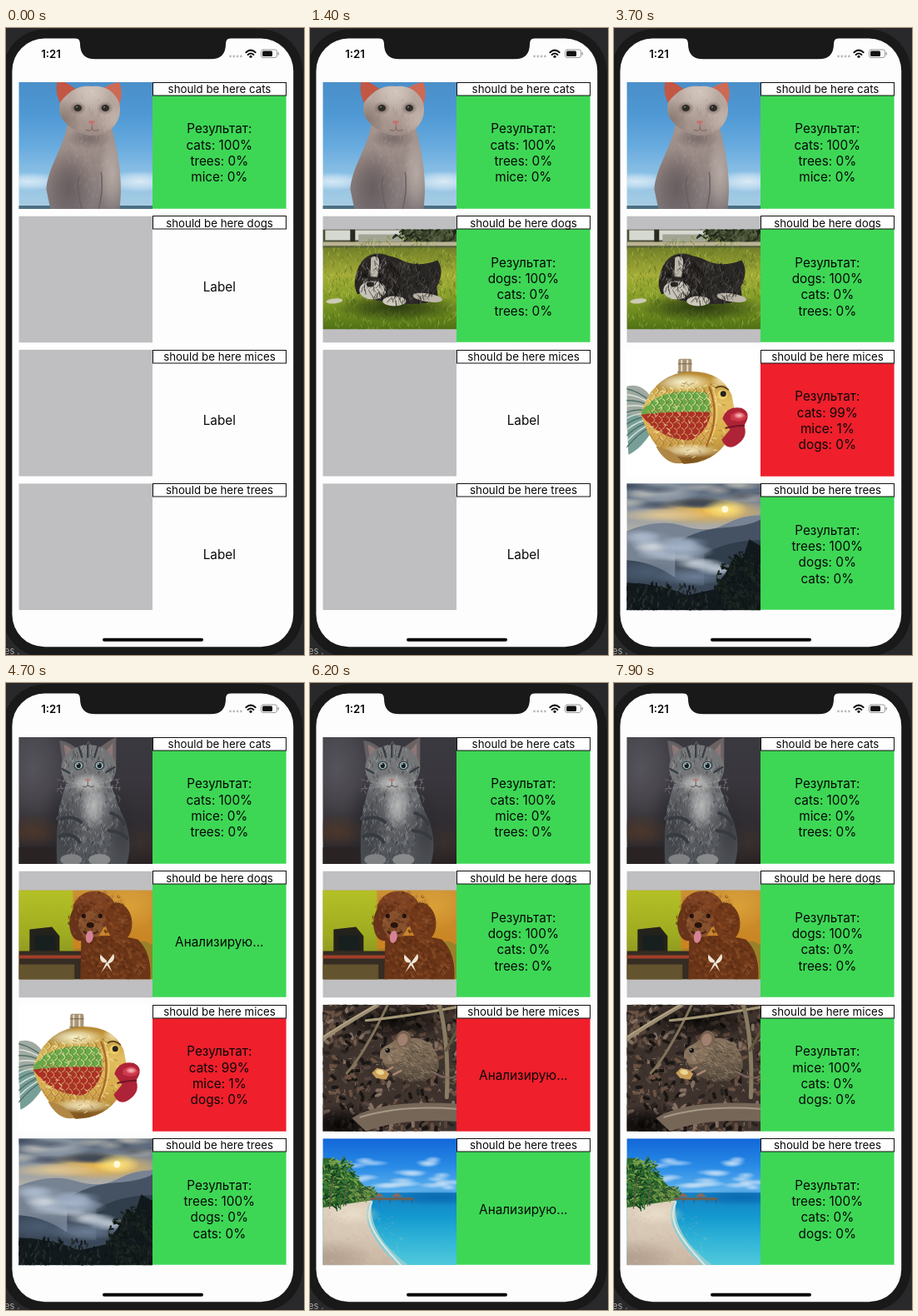
Animation, 358 px wide and 752 px high, one loop 8 s. Source, as an HTML page with a canvas:

```html
<!DOCTYPE html>
<html lang="en">
<head>
<meta charset="utf-8">
<style>
html, body { margin: 0; width: 100%; height: 100%; overflow: hidden; background: #202022; }
canvas { display: block; width: 358px; height: 752px; }
</style>
</head>
<body>
<canvas id="stage"></canvas>
<script>
const W = 358, H = 752, LOOP = 8000;
const GREEN = '#3dd755', RED = '#ef1f2c', GRAY = '#bfbec1';
const canvas = document.getElementById('stage');
const scale = window.devicePixelRatio || 1;
canvas.width = W * scale;
canvas.height = H * scale;
const c = canvas.getContext('2d');

let seed = 1;
const rnd = () => (seed = seed * 16807 % 2147483647) / 2147483647;
const between = (a, b) => a + rnd() * (b - a);
const pick = list => list[Math.floor(rnd() * list.length)];

function rect(color, x, y, w, h, r = 0) {
  c.fillStyle = color;
  c.beginPath();
  c.roundRect(x, y, w, h, r);
  c.fill();
}
function shape(color, d) {
  c.fillStyle = color;
  c.fill(new Path2D(d));
}
function line(color, width, d) {
  c.strokeStyle = color;
  c.lineWidth = width;
  c.lineCap = 'round';
  c.stroke(new Path2D(d));
}
function oval(color, x, y, rx, ry = rx, turn = 0) {
  c.fillStyle = color;
  c.beginPath();
  c.ellipse(x, y, rx, ry, turn, 0, Math.PI * 2);
  c.fill();
}
function fade(y, h, ...colors) {
  const g = c.createLinearGradient(0, y, 0, y + h);
  colors.forEach((color, i) => g.addColorStop(i / (colors.length - 1), color));
  return g;
}
// Blurred blob; color is an "r,g,b" triple.
function glow(rgb, alpha, x, y, rx, ry = rx) {
  c.save();
  c.translate(x, y);
  c.scale(rx, ry);
  const g = c.createRadialGradient(0, 0, 0, 0, 0, 1);
  g.addColorStop(0, `rgba(${rgb},${alpha})`);
  g.addColorStop(0.5, `rgba(${rgb},${alpha * 0.6})`);
  g.addColorStop(1, `rgba(${rgb},0)`);
  c.fillStyle = g;
  c.fillRect(-1, -1, 2, 2);
  c.restore();
}
// Random short strokes inside an ellipse: fur, grass, leaves.
function tufts(n, x, y, rx, ry, len, angle, spread, width, colors) {
  c.lineWidth = width;
  c.lineCap = 'round';
  for (let i = 0; i < n; i++) {
    const a = rnd() * Math.PI * 2, r = Math.sqrt(rnd());
    const px = x + Math.cos(a) * r * rx, py = y + Math.sin(a) * r * ry;
    const t = angle + between(-spread, spread);
    c.strokeStyle = pick(colors);
    c.beginPath();
    c.moveTo(px, py);
    c.lineTo(px + Math.cos(t) * len, py + Math.sin(t) * len);
    c.stroke();
  }
}
function inside(d, draw) {
  c.save();
  c.clip(new Path2D(d));
  draw();
  c.restore();
}

const DOWN = Math.PI / 2;

const photos = {
  blank() { rect(GRAY, 0, 0, 161, 152); },

  whiteKitten() {
    rect(fade(0, 152, '#4a8fc9', '#4e98d4', '#67aade', '#8fc2e5', '#a9cde2'), 0, 0, 161, 152);
    glow('235,244,250', .75, 12, 119, 45, 11);
    glow('235,244,250', .8, 145, 119, 42, 13);
    rect('#4d6f82', 0, 148, 161, 4);
    const body = 'M58 52C53 80 36 100 33 128L38 152H121C126 120 119 82 111 52Z';
    shape(fade(55, 97, '#a5958e', '#938581', '#80777a'), body);
    inside(body, () => {
      glow('85,76,80', .65, 60, 125, 30, 45);
      glow('205,194,186', .6, 112, 110, 17, 45);
      glow('85,75,75', .5, 84, 67, 26, 13);
    });
    line('#675f63', 1.5, 'M72 112Q70 135 76 152M99 108Q102 130 96 152');
    shape('#c25746', 'M46 0Q43 14 51 28L72 11Q60 1 54 0Z');
    shape('#cc6a56', 'M99 9Q110 1 121 0Q126 12 121 28Z');
    const head = 'M50 24Q66 2 88 5Q111 3 121 25Q125 45 109 58Q89 70 69 58Q44 45 50 24Z';
    shape(fade(4, 64, '#b9aba2', '#b4a49b', '#988780'), head);
    inside(head, () => {
      glow('225,214,205', .65, 86, 12, 25, 23);
      glow('104,88,82', .5, 54, 44, 22, 24);
      glow('219,205,196', .45, 114, 47, 20, 20);
    });
    tufts(150, 84, 75, 26, 65, 4, DOWN, .5, .6, ['#d6c9c144', '#716a6d44']);
    for (const x of [71, 104]) {
      glow('73,62,57', .6, x, 31, 10, 8);
      oval('#302d29', x, 31, 4.7, 4);
      oval('#a7afa8', x - 1.3, 29.8, .8);
    }
    shape('#c57370', 'M83 47Q88 45 92 47L88 52Z');
    line('#855c59', 1, 'M88 52V56M81 57Q85 60 88 56Q92 60 96 57');
  },

  lawnPuppy() {
    photos.blank();
    inside('M0 16H161V136H0Z', () => {
      rect('#4b5136', 0, 16, 161, 22);
      rect('#d6d9d1', 3, 17, 92, 12);
      rect('#a3a494', 43, 22, 55, 9);
      tufts(130, 128, 20, 42, 12, 5, 1, 2, 2, ['#1e281a', '#343d25', '#596246']);
      rect('#29291e', 33, 16, 6, 25);
      rect('#bbb394', 0, 31, 161, 5);
      rect('#56633a', 0, 36, 161, 4);
      rect(fade(38, 98, '#737f29', '#a4ad37', '#7e9826', '#4f7115'), 0, 38, 161, 98);
      tufts(900, 80, 87, 102, 60, 4, -DOWN, .8, 1,
        ['#c7cf6477', '#3f601477', '#a4b23577', '#5c7a1e77']);
      glow('29,42,13', .85, 89, 109, 76, 18);
      shape('#292725', 'M53 52Q74 42 97 54Q116 62 138 53Q147 66 137 85L139 101Q102 111 57 99Z');
      oval('#2b2826', 67, 67, 24, 22);
      shape('#262321', 'M44 59Q34 81 42 94L55 89V57Z');
      shape('#25221f', 'M77 52Q101 66 90 93L75 84Z');
      oval('#c8c3b9', 60, 89, 16, 11);
      shape('#bdb7ad', 'M58 50Q65 46 68 53L66 73H57Z');
      tufts(130, 64, 73, 23, 28, 6, DOWN, .8, 1, ['#d9d5cc66', '#302d2bbb', '#171615aa']);
      oval('#25211f', 57, 82, 4.5, 3.2);
      glow('12,12,12', 1, 49, 72, 5, 4);
      glow('12,12,12', 1, 70, 72, 5, 4);
      oval('#cccab5', 14, 102, 10, 3, -.1);
      oval('#beb8ab', 126, 98, 18, 5, .15);
      oval('#d0cabd', 86, 102, 14, 6);
      tufts(260, 100, 78, 43, 25, 6, DOWN, .9, 1, ['#4e4a4588', '#111010aa', '#77716a66']);
    });
  },

  glassFish() {
    rect('#fff', 0, 0, 161, 152);
    shape('#a0aaa1', 'M0 44Q18 39 30 58L20 83L0 96Z');
    shape('#779f97', 'M0 78Q18 76 32 95Q18 119 2 126Z');
    for (let i = 0; i < 11; i++) {
      line(i % 2 ? '#dce5db' : '#526f6b', 1.4, `M0 ${47 + i * 7}Q14 ${50 + i * 5} 29 ${62 + i * 3}`);
    }
    rect('#a89478', 62, 11, 16, 20, 2);
    line('#e9dfc8', 2, 'M66 13V29M73 13V29');
    line('#75644b', 1, 'M62 17H78M61 27H79');
    const body = 'M17 77Q29 35 67 27Q111 22 126 54L131 80L122 108Q105 136 69 137Q32 128 17 77Z';
    shape(fade(27, 110, '#b68934', '#e2be60', '#d8ad4c', '#a37930'), body);
    inside(body, () => {
      glow('115,73,23', .8, 76, 133, 52, 18);
      glow('137,92,30', .7, 45, 35, 28, 15);
      shape('#68a947', 'M18 73Q42 43 97 52L101 76Q52 72 18 80Z');
      shape('#ad3025', 'M17 78Q58 73 101 75Q98 99 76 109Q40 108 17 78Z');
      for (let y = 45; y < 113; y += 7) {
        for (let x = 25 + (y % 14 > 6 ? 5 : 0); x < 100; x += 9) {
          line(y < 72 ? '#e0e19dbb' : '#e7aa76aa', 1.3, `M${x} ${y}q7 4 0 8`);
          line('#52391d77', .7, `M${x + 2} ${y}q7 4 0 8`);
        }
      }
      glow('255,255,221', .9, 67, 39, 36, 11);
      glow('255,244,207', .9, 76, 121, 36, 9);
      glow('255,244,202', .75, 114, 37, 14, 9);
      tufts(100, 78, 82, 51, 48, 4, .3, 1, 1.2, ['#fff4ba99', '#8a622b77']);
    });
    line('#a86624', 2.2, 'M99 45Q113 78 96 115');
    line('#f4da92', 1, 'M103 45Q116 78 99 112');
    shape('#b18746', 'M35 116Q56 119 67 136Q48 140 35 116Z');
    oval('#efcc66', 115, 54, 6);
    oval('#24231c', 116, 53, 3.5);
    line('#453316', 1.4, 'M107 46Q114 41 122 48');
    shape('#ae2337', 'M115 83Q120 67 138 70Q151 76 141 91Q146 104 134 113Q121 123 114 108L124 96Z');
    shape('#cf394b', 'M125 78Q138 69 144 81Q139 89 125 84Z');
    line('#711424', 2, 'M119 94Q131 91 141 91');
    glow('255,208,205', .9, 135, 79, 7, 4);
  },

  foggyHills() {
    rect(fade(0, 90, '#4d5c70', '#87929f', '#b9b4aa', '#8996a6'), 0, 0, 161, 152);
    glow('198,205,210', .7, 43, 8, 48, 16);
    glow('238,182,72', 1, 100, 34, 78, 17);
    glow('229,201,148', .9, 44, 38, 58, 9);
    for (let i = 0; i < 18; i++) {
      glow(pick(['49,61,81', '67,73,83', '197,195,186']), .65, between(0, 161), between(0, 27), between(15, 35), 6);
    }
    glow('255,230,124', 1, 118, 31, 28, 12);
    oval('#fff9d8', 118, 31, 4);
    shape('#778392', 'M0 57Q38 42 68 51T118 49T161 38V152H0Z');
    shape('#455263', 'M58 72Q85 55 116 53T161 43V152H58Z');
    shape('#303d4b', 'M93 85Q121 68 161 68V152H93Z');
    for (let i = 0; i < 24; i++) {
      const x = between(-5, 115);
      glow(pick(['220,226,232', '181,195,213', '142,158,181']), .65, x, 61 + x * .25 + between(-9, 18), 25, 8);
    }
    shape('#394758', 'M0 92Q29 94 52 109T108 122V152H0Z');
    glow('123,143,169', .7, 83, 112, 51, 12);
    glow('87,105,129', .6, 25, 106, 41, 14);
    shape('#12191c', 'M0 119Q39 120 73 134L105 127L119 107L131 84L139 91L147 67L161 75V152H0Z');
    tufts(220, 137, 121, 32, 39, 4, .8, 1.1, 2, ['#0d1513', '#26312788', '#17221d']);
    tufts(170, 40, 142, 65, 20, 4, -DOWN, .7, 2, ['#0d1416', '#262d2d', '#161d1e']);
  },

  grayKitten() {
    rect(fade(0, 152, '#3b3940', '#39363d', '#302d32', '#272428'), 0, 0, 161, 152);
    glow('104,102,109', .6, 17, 38, 48, 75);
    glow('82,58,43', .8, 17, 113, 48, 20);
    rect('#292324', 0, 132, 161, 20);
    glow('62,51,47', .7, 145, 126, 30, 25);
    shape(fade(52, 100, '#74777a', '#606266', '#4d5055'),
      'M57 56Q43 92 46 152H130Q139 119 122 88L109 52Z');
    shape('#656064', 'M53 34L49 4Q59 4 75 18Z');
    shape('#6b6264', 'M94 15Q109 3 117 0L117 35Z');
    shape('#8d7779', 'M57 27L54 9Q61 10 68 20ZM104 18L113 7L113 25Z');
    oval('#747577', 84, 37, 33, 28);
    glow('39,41,47', .55, 54, 107, 24, 55);
    glow('42,42,47', .6, 124, 109, 20, 48);
    tufts(520, 84, 79, 39, 75, 4, DOWN, .7, 1, ['#b8baba66', '#32373d99', '#888b8d77']);
    line('#353a40', 2.2, 'M72 11L76 24M83 9V24M95 11L91 24M52 38L61 43M115 36L105 42');
    line('#363b41', 4, 'M51 98Q65 93 75 102M49 119Q65 113 73 126M111 91Q124 96 126 104M108 112Q122 113 130 121');
    glow('200,199,197', .9, 83, 55, 22, 12);
    glow('196,196,195', .85, 90, 82, 17, 30);
    for (const x of [72, 97]) {
      oval('#30373c', x, 34, 5.9, 5.2);
      oval('#97b2b7', x, 34, 4.7, 4.2);
      oval('#171c20', x, 34, 2.6, 3.1);
      oval('#ddd', x - 1, 32.2, .8);
    }
    shape('#a9807d', 'M78 50H87L83 54Z');
    line('#595558', 1, 'M83 54V58M77 59Q80 61 83 58Q87 61 90 59');
    line('#d0cfcc66', .6, 'M72 56L46 51M72 59L46 62M94 56L121 50M95 59L122 61');
    oval('#7f8183', 63, 147, 13, 7);
    oval('#888a8c', 97, 147, 13, 7);
  },

  poodle() {
    photos.blank();
    inside('M0 23H161V130H0Z', () => {
      rect('#b47b26', 0, 23, 161, 107);
      rect(fade(23, 107, '#b4c126', '#9fab20', '#788224'), 0, 23, 66, 107);
      rect(fade(23, 70, '#cb9134', '#ca8421'), 65, 23, 96, 70);
      glow('229,174,62', .55, 133, 42, 38, 30);
      shape('#24221b', 'M13 70L40 67L49 78V107H13Z');
      shape('#352c23', 'M0 96H78V130H0Z');
      rect('#a23f2b', 0, 101, 76, 4);
      rect('#18201f', 19, 77, 25, 18);
      rect('#63532f', 0, 112, 67, 18);
      shape('#968229', 'M133 88Q150 80 161 89V130H133Z');
      shape('#6b3518', 'M75 82Q105 73 143 82Q160 98 158 130H74Z');
      oval('#7c4122', 91, 47, 26, 23);
      oval('#67331a', 75, 61, 14, 23, .1);
      oval('#703819', 120, 61, 16, 23, -.15);
      oval('#86502e', 87, 64, 15, 16);
      for (let i = 0; i < 420; i++) {
        const a = rnd() * 7, r = Math.sqrt(rnd());
        const [x, y, rx, ry] = pick([[96, 55, 37, 32], [116, 108, 40, 27]]);
        c.beginPath();
        c.arc(x + Math.cos(a) * rx * r, y + Math.sin(a) * ry * r, 1.5, 0, 4.5);
        c.lineWidth = 1;
        c.strokeStyle = pick(['#a3643888', '#4b230f99', '#89492277']);
        c.stroke();
      }
      oval('#21130d', 78, 54, 2.6);
      oval('#21130d', 98, 54, 2.6);
      oval('#25150f', 86, 65, 4.5, 3.3);
      line('#422014', 2, 'M78 73Q86 78 95 73');
      oval('#d48294', 85, 79, 4.5, 7.5, .15);
      shape('#eee5d5', 'M106 108L98 100Q96 111 106 110L114 99Q117 108 108 111L112 121L106 113L99 122Z');
    });
  },

  forestMouse() {
    rect('#3f332e', 0, 0, 161, 152);
    tufts(550, 80, 75, 110, 98, 5, 0, 3.1, 4,
      ['#29221e', '#54443b', '#6a5142', '#3b302b', '#837062', '#191613']);
    tufts(300, 80, 75, 110, 98, 3, 0, 3.1, 1, ['#b29c8699', '#1e1916', '#83604c99']);
    glow('0,0,0', .9, 20, 145, 52, 24);
    glow('0,0,0', .8, 88, 20, 65, 24);
    line('#9b8c70', 5, 'M-2 42Q25 24 65 1');
    line('#b5a68b', 1.4, 'M-2 40Q25 22 65 0');
    line('#82735b', 3, 'M29 82Q50 59 78 0');
    line('#a49775', 3, 'M52 19Q94 15 161 3');
    line('#887c62', 5, 'M140 0Q152 45 149 111');
    line('#65573f', 3, 'M148 55L161 31');
    shape('#766658', 'M35 136Q72 113 161 119V140Q91 136 52 152Z');
    line('#a49a86', 2, 'M45 135Q94 120 160 125');
    shape(fade(37, 55, '#877460', '#74634f', '#504439'),
      'M70 58Q85 38 105 40Q132 38 139 66Q143 91 112 92Q88 92 79 77Q68 69 70 58Z');
    line('#7d675c', 2, 'M135 82Q151 92 161 85');
    tufts(320, 110, 67, 27, 24, 4, .6, .5, .8, ['#ab967d99', '#41382f99', '#83725c99']);
    oval('#87725c', 83, 59, 15, 12, -.4);
    tufts(80, 86, 58, 14, 10, 4, .3, .5, .7, ['#b2a08899', '#5f504299']);
    oval('#79624f', 97, 41, 9, 10, .3);
    oval('#a28070', 96, 42, 6, 7.5, .3);
    oval('#111', 78, 55, 2.8);
    oval('#ddd', 77, 54, .7);
    oval('#3a2925', 70, 67, 2.2);
    line('#b5a68a66', .6, 'M72 66L58 60M72 68L57 70');
    line('#a98672', 2.5, 'M84 75L76 80M94 79L85 84');
    shape('#c89e57', 'M59 82L65 76L74 78L80 83L76 90L64 88Z');
    oval('#ead593', 69, 81, 5, 3, .2);
  },

  beach() {
    rect(fade(0, 66, '#1267d8', '#288ae5', '#64b5ed'), 0, 0, 161, 66);
    for (let i = 0; i < 22; i++) {
      glow('220,235,249', .65, between(15, 160), between(25, 59), between(9, 25), 4);
    }
    rect(fade(65, 87, '#147fc4', '#1499d0', '#32b5d8', '#50c8db'), 0, 65, 161, 87);
    glow('0,81,157', .5, 138, 71, 65, 10);
    shape('#8dcbd2', 'M0 78Q51 72 60 75Q55 91 66 112Q76 132 103 152H0Z');
    line('#d7e9e2', 2, 'M59 76Q52 91 60 108T94 152');
    shape(fade(74, 78, '#dfd1bd', '#d7c7b5', '#c9b5a2'), 'M0 76L59 74Q48 88 56 106Q65 130 91 152H0Z');
    glow('153,133,119', .5, 8, 143, 53, 22);
    glow('238,227,207', .7, 35, 91, 35, 13);
    tufts(230, 38, 120, 57, 42, 3, .5, .3, .7, ['#eadfcd55', '#b29f8f44']);
    shape('#2f672d', 'M0 24Q13 21 20 33L36 43L49 56L65 67L58 74L0 83Z');
    tufts(330, 16, 53, 24, 28, 6, .4, 1.5, 1.5, ['#123e20', '#3b7b35', '#80a549', '#255c29']);
    tufts(120, 46, 66, 17, 8, 4, 0, 1.2, 1.5, ['#234d2b', '#5a8540', '#809a4c']);
    line('#6b5b40', 1.2, 'M8 84L13 47M25 81L29 54');
    rect('#70604f', 57, 71, 52, 3);
    shape('#8b6951', 'M62 70L68 65L74 70ZM82 70L89 65L96 70Z');
    line('#5c5045', 1, 'M68 74V77M81 74V77M96 74V77M107 74V77');
  }
};

const rows = ['cats', 'dogs', 'mices', 'trees'].map((name, i) => ({ name, y: 65 + i * 160.4 }));
// time, row, photo, label and percent pairs; without pairs the row is still analysing
const events = [
  [0, 0, 'whiteKitten', 'cats 100,trees 0,mice 0', GREEN],
  [500, 1, 'lawnPuppy'],
  [900, 1, 'lawnPuppy', 'dogs 100,cats 0,trees 0', GREEN],
  [1500, 2, 'glassFish'],
  [1700, 3, 'foggyHills'],
  [1800, 2, 'glassFish', 'cats 99,mice 1,dogs 0', RED],
  [2200, 3, 'foggyHills', 'trees 100,dogs 0,cats 0', GREEN],
  [4400, 0, 'grayKitten'],
  [4600, 1, 'poodle'],
  [4700, 0, 'grayKitten', 'cats 100,mice 0,trees 0', GREEN],
  [5000, 1, 'poodle', 'dogs 100,cats 0,trees 0', GREEN],
  [6000, 2, 'forestMouse'],
  [6200, 3, 'beach'],
  [6300, 2, 'forestMouse', 'mice 100,cats 0,dogs 0', GREEN],
  [6800, 3, 'beach', 'trees 100,cats 0,dogs 0', GREEN]
];

function text(str, x, y, size, weight = 400, color = '#080808', align = 'center') {
  c.font = `${weight} ${size}px Inter, sans-serif`;
  c.textAlign = align;
  c.textBaseline = 'alphabetic';
  c.fillStyle = color;
  c.fillText(str, x, y);
}

function drawPhone() {
  rect('#29292b', 0, 0, W, H);
  rect('#191919', -5, 0, 363, 755, 53);
  line('#3b3b3d', .7, 'M-5 53A53 53 0 0 1 48 .4H305A53 53 0 0 1 357.6 53V702A53 53 0 0 1 305 755');
  text('es .', -2, 751, 11, 400, '#aaa', 'left');
  rect('#fdfdfd', 7.4, 12.5, 337.8, 729.8, 39);
  shape('#191919', 'M83 12Q89 12.5 89 19Q89 37.3 107 37.3H246Q264 37.3 264 19Q264 12.5 270 12Z');
  text('1:21', 54, 35.5, 13.2, 600);
  for (let i = 0; i < 4; i++) oval('#bbb', 269.5 + i * 4.3, 34, 1.4);
  line('#111', 2, 'M288.3 29.2Q294 24 299.7 29.2M290.6 32Q294 29 297.4 32');
  oval('#111', 294, 34.3, 1.6);
  line('#999', 1, 'M309 26H323Q325.5 26 325.5 28.5V33Q325.5 35.5 323 35.5H309Q306.5 35.5 306.5 33V28.5Q306.5 26 309 26');
  rect('#111', 308, 27.5, 12, 6.5, 1.5);
  rect('#999', 326.7, 29, 1.3, 3.5, .6);
  rect('#080808', 116, 731.8, 121, 4, 2);
}

function drawRow(row, { photo, result, color }, index) {
  c.save();
  c.translate(15.3, row.y);
  c.beginPath();
  c.rect(0, 0, 161, 152);
  c.clip();
  seed = 97 + index * 31;
  photos[photo]();
  c.restore();

  const top = Math.round(row.y);
  rect(color, 176, top, 160.6, 151.7);
  rect('#fff', 176, top, 160.6, 16);
  c.strokeStyle = '#111';
  c.lineWidth = 1;
  c.strokeRect(176.5, top + .5, 160, 15.5);
  text('should be here ' + row.name, 256.5, row.y + 13.1, 13.3);

  const lines = result.includes(',')
    ? ['Результат:', ...result.split(',').map(s => s.replace(' ', ': ') + '%')]
    : [result];
  const first = row.y + 90.4 - (lines.length - 1) * 9.65;
  lines.forEach((str, i) => text(str, 256.3, first + i * 19.3, 15.3));
}

function render(count) {
  const cells = rows.map(() => ({ photo: 'blank', result: 'Label', color: '#fdfdfd' }));
  for (const [, row, photo, result = 'Анализирую...', color = cells[row].color] of events.slice(0, count)) {
    cells[row] = { photo, result, color };
  }
  c.setTransform(scale, 0, 0, scale, 0, 0);
  drawPhone();
  rows.forEach((row, i) => drawRow(row, cells[i], i));
}

const start = performance.now();
let shown = 0;
function tick() {
  const t = (performance.now() - start) % LOOP;
  const count = events.filter(e => e[0] <= t).length;
  if (count !== shown) render(shown = count);
  requestAnimationFrame(tick);
}
tick();
</script>
</body>
</html>
```
